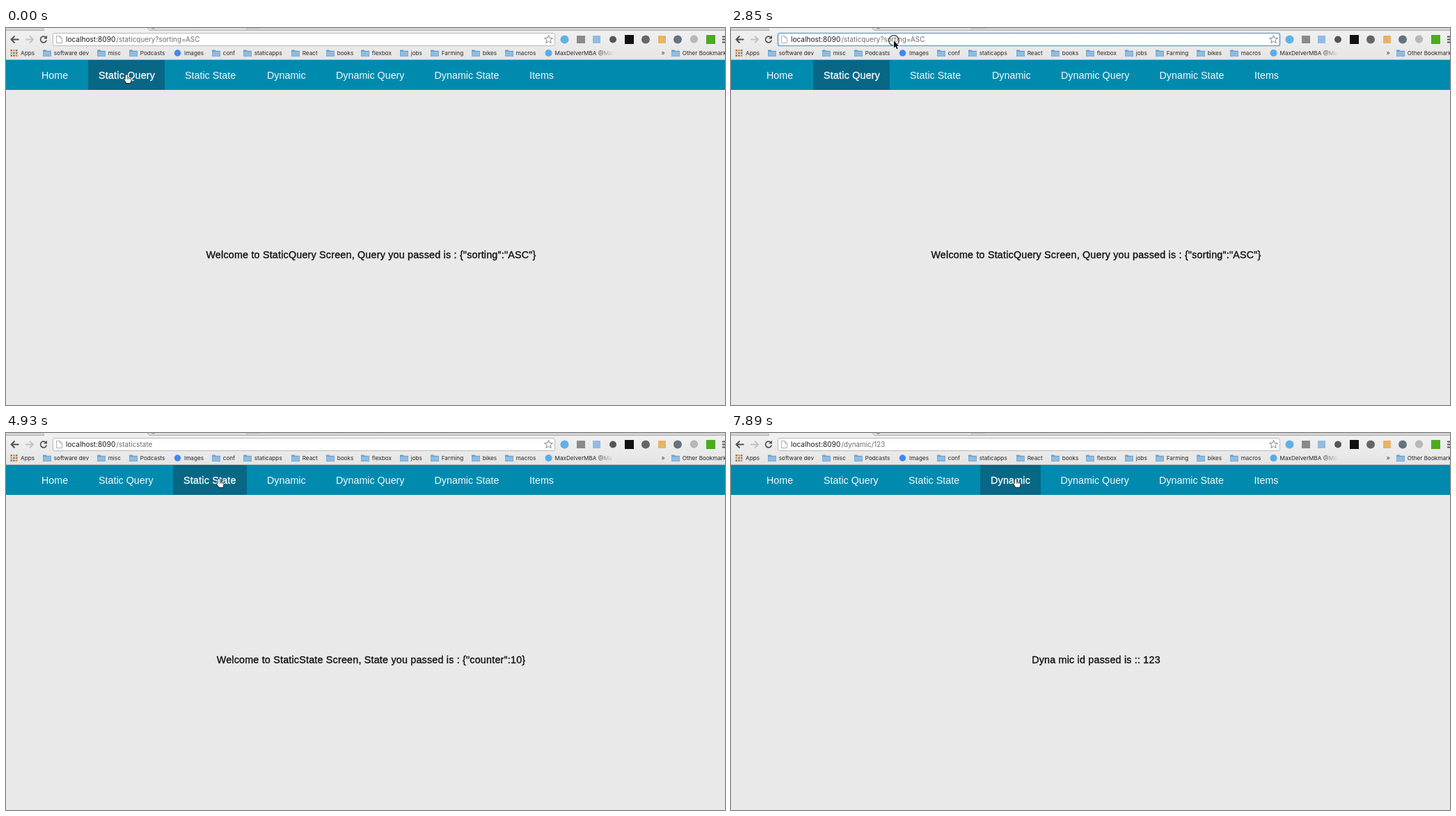
Animation, 1033 px wide and 542 px high, one loop 8000 ms. Source, as an HTML page with a canvas:

```html
<!DOCTYPE html>
<html lang="en">
<head>
<meta charset="utf-8">
<title>Router demo</title>
<style>
html, body { margin: 0; width: 100%; height: 100%; overflow: hidden; background: #e9e9e9; }
canvas { display: block; }
</style>
</head>
<body>
<canvas id="stage" width="1033" height="542"></canvas>
<script>
const ctx = document.getElementById('stage').getContext('2d');
const LOOP = 8000;
const UI = 'Inter, Roboto, sans-serif';
const PAGE = '"Liberation Sans", Arial, sans-serif';

const NAV = ['Home', 'Static Query', 'Static State', 'Dynamic', 'Dynamic Query', 'Dynamic State', 'Items'];
const PAGES = [
  { from: 0, active: 1, box: [118, 110], path: '/staticquery?sorting=ASC',
    nav: [51, 133, 257, 375, 474, 615.5, 752],
    body: 'Welcome to StaticQuery Screen, Query you passed is : {"sorting":"ASC"}' },
  { from: 4930, active: 2, box: [240, 106], path: '/staticstate',
    nav: [51, 133, 255, 375, 474, 615.5, 752],
    body: 'Welcome to StaticState Screen, State you passed is : {"counter":10}' },
  { from: 7890, active: 3, box: [358, 87], path: '/dynamic/123',
    nav: [51, 133, 255, 373, 473.5, 615, 751.5],
    body: 'Dyna mic id passed is :: 123' }
];

const FOLDERS = [
  [53, 'software dev'], [131, 'misc'], [177, 'Podcasts'], [296, 'conf'], [341, 'staticapps'],
  [410, 'React'], [460, 'books'], [510, 'flexbox'], [566, 'jobs'], [610, 'Farming'],
  [669, 'bikes'], [717, 'macros'], [956, 'Other Bookmarks']
];

// Cursor moves: start, end, number of steps, then [progress, x, y] points
const MOVES = [
  [140, 1090, 7, [0, 173, 67], [.5, 480, 200], [1, 778, 341]],
  [1240, 2260, 8, [0, 778, 341], [.3, 700, 300], [.75, 319, 100], [1, 186, 8]],
  [2410, 3290, 7, [0, 186, 8], [.35, 234, 18], [.72, 234, 18], [1, 305, 16]],
  [3590, 4040, 4, [0, 305, 16], [.25, 305, 16], [1, 306, 66]],
  [4930, 5370, 4, [0, 306, 66], [.25, 306, 66], [1, 757, 321]],
  [5970, 7000, 8, [0, 757, 321], [.625, 418, 76], [1, 409, 66]]
];
const CLICKS = [[2700, 3000], [3590, 3740], [4630, 4930], [7750, 7890]];

const HAND = new Path2D('M-1.3 .8Q0-.8 1.3 .8V4.6L5.4 5.6Q6.8 6 6.6 8L5.6 12H.2L-3 7.6Q-3 6-1.3 7Z');
const FINGERS = new Path2D('M1.3 4.6V7M3.2 5V7M5 5.5V7');
const ARROW = new Path2D('M0 0V10.8L2.4 8.6L4 12.4L5.8 11.6L4.2 8H7.2Z');
const BEAM = new Path2D('M-2-5Q0-5 0-3.6Q0-5 2-5M0-3.6V3.6M-2 5Q0 5 0 3.6Q0 5 2 5');

const within = (t, [a, b]) => t >= a && t < b;

function rect(x, y, w, h, color) {
  ctx.fillStyle = color;
  ctx.fillRect(x, y, w, h);
}

function dot(x, y, r, color) {
  ctx.fillStyle = color;
  ctx.beginPath();
  ctx.arc(x, y, r, 0, 7);
  ctx.fill();
}

function line(d, color, width = 1) {
  ctx.strokeStyle = color;
  ctx.lineWidth = width;
  ctx.stroke(new Path2D(d));
}

function shape(d, color) {
  ctx.fillStyle = color;
  ctx.fill(new Path2D(d));
}

function text(str, x, y, size, family, color, { medium = false, align = 'left' } = {}) {
  ctx.font = `${size}px ${family}`;
  ctx.letterSpacing = medium ? '0.21px' : '0px';
  ctx.textAlign = align;
  ctx.fillStyle = color;
  ctx.fillText(str, x, y);
  if (medium) {
    ctx.strokeStyle = color;
    ctx.lineWidth = .35;
    ctx.strokeText(str, x, y);
  }
}

function gradient(x0, y0, x1, y1, from, to) {
  const g = ctx.createLinearGradient(x0, y0, x1, y1);
  g.addColorStop(0, from);
  g.addColorStop(1, to);
  return g;
}

function drawTabs() {
  rect(0, 0, 1033, 46, gradient(0, 4, 0, 45, '#f0f0f0', '#e5e5e5'));
  rect(0, 0, 1033, 3, '#d3d3d3');
  shape('M53 0H203L205 4H55Z', '#f0f0f0');
  shape('M204 0H344L347 3H206Z', '#dedede');
  line('M0 3.5H55L53 0M203 0L206 3.5H345L347 0M348 0H365M345 3.5H1033', '#b2b2b2');
  rect(209, 0, 5, 1.5, '#a5a5a5');
}

function drawToolbar(page, t) {
  line('M18.5 16.5H8.5M12.5 11.5L7.5 16.5L12.5 21.5', '#505050', 1.8);
  line('M28 16.5H38M34 11.5L39 16.5L34 21.5', '#c2c2c2', 1.8);
  line('M57.3 13.6A4.4 4.4 0 1 0 58.2 17.5', '#505050', 1.7);
  shape('M59 10.8V15.6H54.2Z', '#505050');

  const focused = within(t, [2700, 4630]);
  ctx.beginPath();
  ctx.roundRect(67.5, 7.5, 721, 18, 2.5);
  ctx.fillStyle = '#fff';
  ctx.fill();
  ctx.strokeStyle = focused ? '#6fa3d8' : '#b9b9b9';
  ctx.lineWidth = focused ? 1.7 : 1;
  ctx.stroke();
  line('M72.5 11.5H77.5L80.5 14.5V21.5H72.5ZM77.5 11.5V14.5H80.5', '#a8a8a8', .9);

  if (within(t, [3000, 3590])) rect(86, 9, 193, 15, '#b4d5fe');
  text('localhost:8090', 86, 20, 10.1, UI, '#1c1c1c');
  text(page.path, 158.5, 20, 9.9, UI, '#6e6e6e');
  if (within(t, [3590, 4340])) rect(279, 10, 1, 13, '#111');

  let star = '';
  for (let i = 0; i < 10; i++) {
    const a = i * Math.PI / 5, r = i % 2 ? 2.7 : 6.2;
    star += `${i ? 'L' : 'M'}${779.5 + r * Math.sin(a)} ${16.5 - r * Math.cos(a)}`;
  }
  line(star + 'Z', '#858585');

  dot(802.5, 16.5, 6, '#62b1e6');
  rect(820, 11, 12, 11, '#8a8a8a');
  rect(843, 11, 11, 11, '#92bbe2');
  dot(872, 16.5, 5, '#555');
  rect(889, 10, 13, 13, '#111');
  dot(919, 16.5, 6, '#666');
  rect(937, 11, 11, 11, '#e7b366');
  dot(965, 16.5, 6, '#66727e');
  dot(988.5, 16, 5.7, '#b7b7b7');
  rect(1006, 10, 13, 13, '#4cab1e');
  line('M1029 12.5H1033M1029 16.5H1033M1029 20.5H1033', '#555', 1.8);
}

function drawBookmarks() {
  const label = (str, x, color = '#262626') => text(str, x, 39, 8.2, UI, color);
  const colors = ['#dd5144', '#e28b36', '#3d9b62'];
  for (let i = 0; i < 9; i++) {
    rect(6.5 + i % 3 * 3.7, 31 + (i / 3 | 0) * 3.7, 2.5, 2.5, colors[(i + (i / 3 | 0)) % 3]);
  }
  label('Apps', 21);
  dot(246.5, 36, 4.7, '#4285f4');
  label('Images', 256);
  for (const [x, name] of FOLDERS) {
    shape(`M${x} 31.5h4.5l1 1.2h6.5v8.3h-12z`, '#6c9fca');
    rect(x + .5, 34, 11, 6.5, '#8fbce2');
    label(name, x + 15.7);
  }
  dot(779.5, 36, 5, '#55acee');
  label('MaxDelverMBA @Max', 788.5, gradient(848, 0, 873, 0, '#262626', 'rgba(38,38,38,0)'));
  text('»', 941.5, 39, 9, UI, '#444');
  rect(0, 45, 1033, 1, '#bcbcbc');
}

function drawPage(page) {
  rect(0, 46, 1033, 43, '#008bae');
  rect(page.box[0], 46, page.box[1], 43, '#076785');
  NAV.forEach((name, i) =>
    text(name, page.nav[i], 73.3, 14.3, PAGE, '#f4fafc', { medium: i === page.active }));
  text(page.body, 524.5, 330.6, 14.3, PAGE, '#111', { medium: true, align: 'center' });
}

function cursorAt(t) {
  const move = MOVES.findLast(m => t >= m[0]);
  if (!move) return [173, 67];
  const [start, end, steps, ...points] = move;
  const k = Math.floor((t - start) / (end - start) * (steps - 1) + 1e-6);
  const p = Math.min(1, (k + 1) / steps);
  const i = Math.max(1, points.findIndex(q => q[0] >= p));
  const [a, b] = [points[i - 1], points[i]];
  const f = (p - a[0]) / (b[0] - a[0]);
  return [a[1] + (b[1] - a[1]) * f, a[2] + (b[2] - a[2]) * f];
}

function drawCursor(t) {
  const [x, y] = cursorAt(t);
  ctx.save();
  ctx.translate(x, y);
  ctx.lineJoin = 'round';
  if (CLICKS.some(c => within(t, c))) {
    ctx.beginPath();
    ctx.arc(0, 0, 7.3, 0, 7);
    ctx.strokeStyle = '#333';
    ctx.lineWidth = 1.2;
    ctx.stroke();
  }
  if (y >= 46 && y < 89) {
    ctx.strokeStyle = '#111';
    ctx.fillStyle = '#fff';
    ctx.lineWidth = 1.4;
    ctx.stroke(HAND);
    ctx.fill(HAND);
    ctx.lineWidth = .6;
    ctx.stroke(FINGERS);
  } else if (y < 26 && t >= 3000) {
    ctx.strokeStyle = '#222';
    ctx.lineWidth = 1.1;
    ctx.stroke(BEAM);
  } else {
    ctx.strokeStyle = '#fff';
    ctx.lineWidth = 1.6;
    ctx.stroke(ARROW);
    ctx.fillStyle = '#111';
    ctx.fill(ARROW);
  }
  ctx.restore();
}

function draw(now) {
  const t = now % LOOP;
  const page = PAGES.findLast(p => t >= p.from);
  rect(0, 0, 1033, 542, '#e9e9e9');
  drawTabs();
  drawToolbar(page, t);
  drawBookmarks();
  drawPage(page);
  drawCursor(t);
}

const begin = performance.now();
function frame() {
  draw(performance.now() - begin);
  requestAnimationFrame(frame);
}
frame();
</script>
</body>
</html>
```
